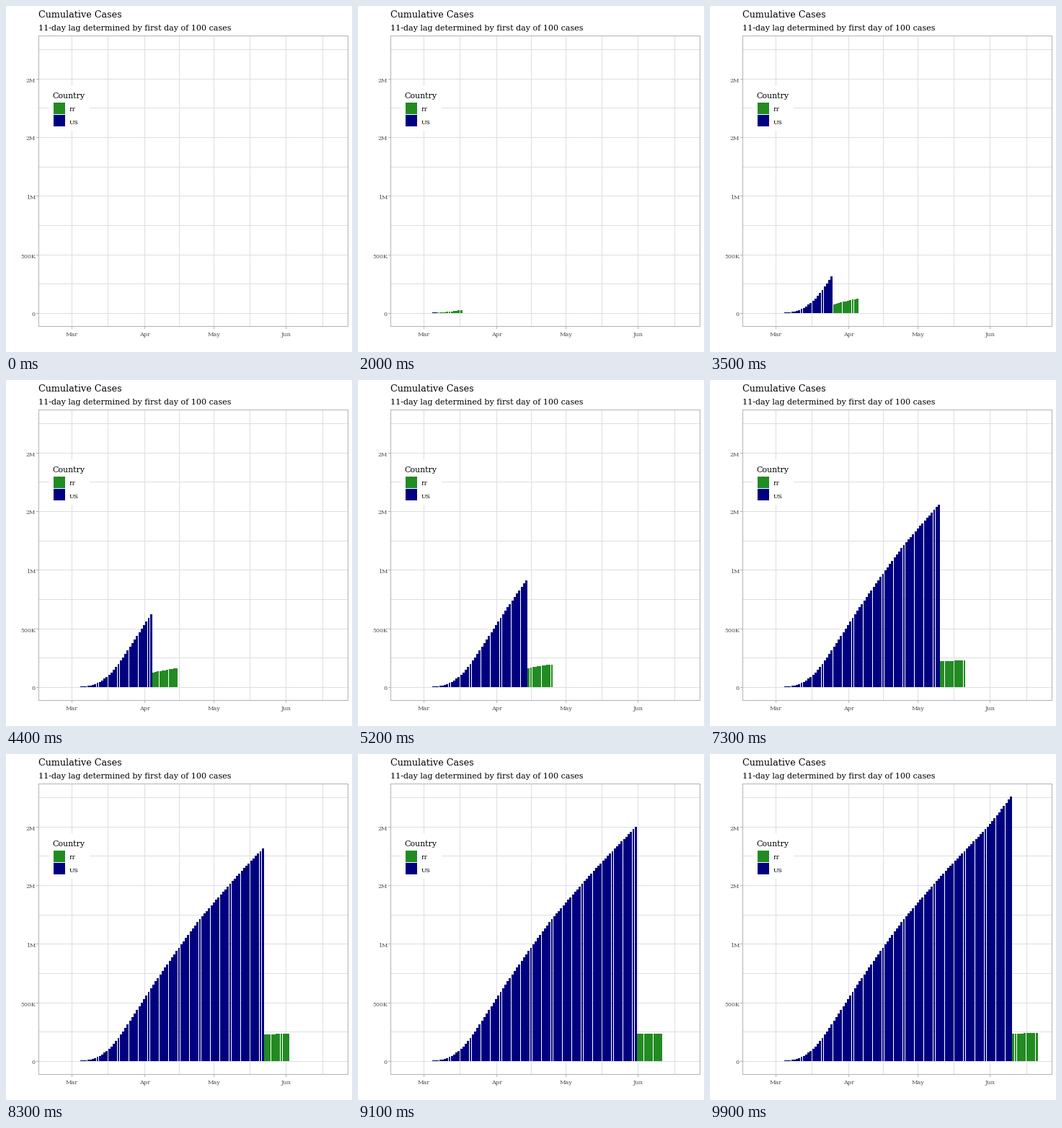
A matplotlib script that plays this animation: 480 px wide and 480 px high, repeating every 10000 ms.

```python
import math

import matplotlib.pyplot as plt
import numpy as np
from matplotlib.animation import FuncAnimation
from matplotlib.patches import Rectangle

SIZE, FRAMES, INTERVAL = 480, 100, 100
GREEN, NAVY = "#228B22", "#000080"
GRID, BORDER, LABEL = "#DEDEDE", "#B3B3B3", "#4D4D4D"
PANEL_LEFT, PANEL_TOP, PANEL_RIGHT, PANEL_BOTTOM = 45, 41, 474, 444

# Day 0 is 1 March; the data runs from day -8 to day 112.
FIRST_DAY, LAST_DAY, LAG = -8, 112, 11
MONTHS = {"Mar": 31, "Apr": 30, "May": 31, "Jun": 31}
ORIGIN, DAY_WIDTH, BAR_SHARE = 91.95, 3.2286, 0.9
BASELINE, PX_PER_K = 426.56, 0.16272

# Key points: (day, thousands of cases). The US ones are shifted by the lag.
US_KEYS = [(3, 2.95), (5, 4.7), (8, 14.3), (12, 46.4), (17, 125), (24, 312.2),
           (31, 530), (45, 939), (53, 1158), (65, 1443), (73, 1623),
           (83, 1832), (92, 2023), (101, 2255)]
IT_KEYS = [(4, 3.1), (9, 9.2), (18, 35.7), (25, 74.4), (31, 105.8), (42, 152),
           (55, 193), (70, 218.3), (90, 232.2), (112, 238.3)]

fig = plt.figure(figsize=(SIZE / 100, SIZE / 100), dpi=100, facecolor="white")
ax = fig.add_axes([0, 0, 1, 1])
ax.set(xlim=(0, SIZE), ylim=(SIZE, 0))
ax.axis("off")


def day_x(day):
    return math.floor(ORIGIN + DAY_WIDTH * day)


def cases_y(thousands):
    return math.floor(BASELINE - PX_PER_K * thousands)


def smooth_curve(keys):
    """Sample a cubic Hermite curve through the key points once per day."""
    x, y = np.array(keys, float).T
    slope = np.gradient(y, x)
    days = np.arange(int(x[0]), int(x[-1]) + 1)
    i = np.clip(np.searchsorted(x, days, side="right") - 1, 0, len(x) - 2)
    span = x[i + 1] - x[i]
    t = (days - x[i]) / span
    blend = t * t * (3 - 2 * t)
    values = (y[i] + (y[i + 1] - y[i]) * blend
              + span * t * (1 - t) * (slope[i] * (1 - t) - slope[i + 1] * t))
    return zip(days, values)


def box(left, top, right, bottom, color, z):
    return ax.add_patch(Rectangle((left, top), right - left, bottom - top,
                                  facecolor=color, linewidth=0,
                                  antialiased=False, zorder=z))


def text(x, y, label, px, color="black", align="left"):
    ax.text(x, y, label, fontsize=px * 0.72, color=color, ha=align,
            va="baseline", family="DejaVu Serif", zorder=6)


def vertical_grid(day):
    x = day_x(day)
    box(x, PANEL_TOP, x + 1, PANEL_BOTTOM, GRID, 1)
    return x


def draw_panel():
    day = 0
    for month, length in MONTHS.items():
        x = vertical_grid(day)
        vertical_grid(day + length / 2)
        box(x, PANEL_BOTTOM, x + 1, PANEL_BOTTOM + 4, BORDER, 3)
        text(x + 0.5, 458, month, 8.2, LABEL, "center")
        day += length

    for step in range(10):
        y = cases_y(250 * step)
        box(PANEL_LEFT, y, PANEL_RIGHT, y + 1, GRID, 1)
    for step, amount in enumerate(("0", "500K", "1M", "2M", "2M")):
        y = cases_y(500 * step)
        box(PANEL_LEFT - 3, y, PANEL_LEFT, y + 1, BORDER, 3)
        text(41, y + 4.5, amount, 8, LABEL, "right")

    for y in (PANEL_TOP, PANEL_BOTTOM):
        box(PANEL_LEFT, y, PANEL_RIGHT + 1, y + 1, BORDER, 4)
    for x in (PANEL_LEFT, PANEL_RIGHT):
        box(x, PANEL_TOP, x + 1, PANEL_BOTTOM + 1, BORDER, 4)

    text(45, 16.5, "Cumulative Cases", 12.75)
    text(45, 33.5, "11-day lag determined by first day of 100 cases", 11.1)


def draw_legend():
    box(60, 110, 116, 173, "white", 4)
    text(64.5, 128, "Country", 11)
    for top, color, code in ((134, GREEN, "IT"), (151, NAVY, "US")):
        box(66, top, 82, top + 16, color, 5)
        text(88, top + 12.5, code, 8.4)


def make_bars(keys, color, delay, z):
    """Return (day of appearance, patch) for each bar at least a pixel tall."""
    bars = []
    for day, cases in smooth_curve(keys):
        top, bottom = cases_y(cases), cases_y(0)
        if top < bottom:
            left, right = day_x(day - BAR_SHARE / 2), day_x(day + BAR_SHARE / 2)
            bars.append((day + delay, box(left, top, right, bottom, color, z)))
    return bars


draw_panel()
draw_legend()
bars = make_bars(IT_KEYS, GREEN, 0, 2) + make_bars(US_KEYS, NAVY, LAG, 3)


def update(frame):
    frames_per_day = (FRAMES - 1) / (LAST_DAY - FIRST_DAY)
    today = FIRST_DAY + math.floor((frame + 0.5) / frames_per_day)
    for day, bar in bars:
        bar.set_visible(day <= today)
    return [bar for _, bar in bars]


animation = FuncAnimation(fig, update, frames=FRAMES, interval=INTERVAL,
                          repeat=True, repeat_delay=0, blit=False)
plt.show()
```
